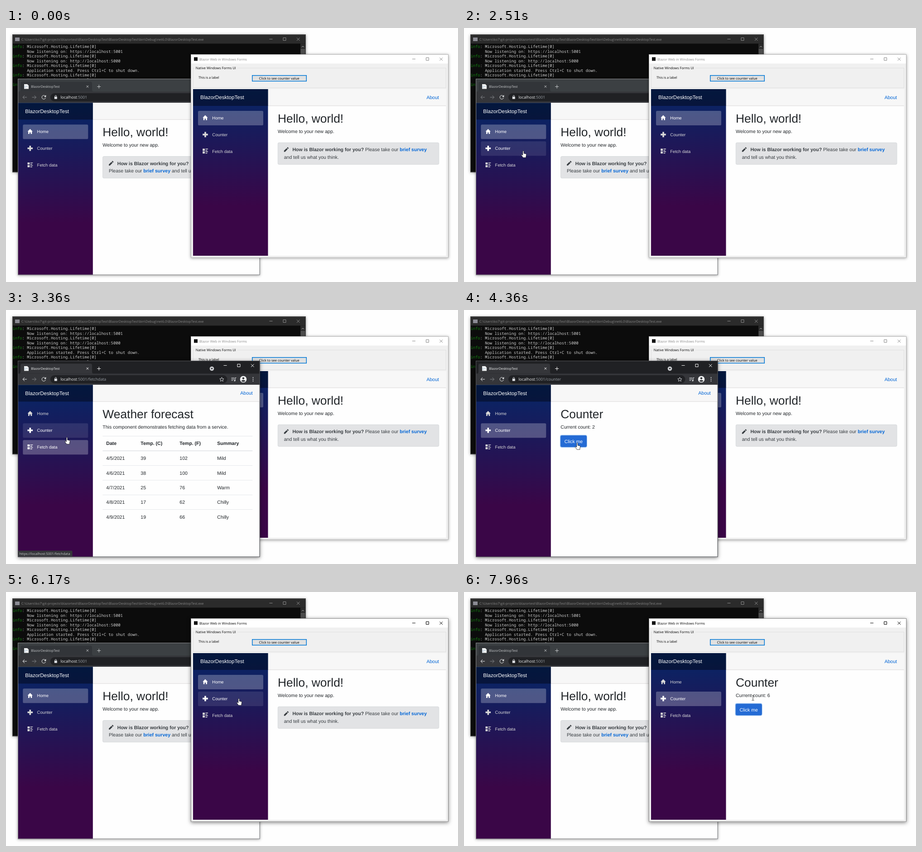
An HTML page for the animation above (8 s loop, 998 px wide and 561 px high).

```html
<!DOCTYPE html>
<html lang="en">
<head>
<meta charset="utf-8">
<title>Desktop and browser demo</title>
<style>
  html, body { margin: 0; width: 100%; height: 100%; overflow: hidden; background: #fefefe; }
  svg { display: block; width: 998px; height: 561px; }
  text { white-space: pre; text-rendering: geometricPrecision; font-family: "Liberation Sans", Arial, sans-serif; }
  .ui text { font-family: "Open Sans", "Noto Sans", sans-serif; }
  .mono text { font-family: "Noto Sans Mono", "DejaVu Sans Mono", monospace; }
  .line { fill: none; stroke-width: 1; }
  .shadow { filter: drop-shadow(0 1px 3px rgba(0,0,0,.4)); }
  .shadow.deep { filter: drop-shadow(0 2px 4.5px rgba(0,0,0,.5)); }
</style>
</head>
<body>
<svg viewBox="0 0 998 561">
  <defs>
    <linearGradient id="side" x1="0" y1="0" x2="0" y2="1">
      <stop offset="0" stop-color="#052767"/>
      <stop offset=".7" stop-color="#3a0647"/>
    </linearGradient>
  </defs>
  <g id="scene"></g>
  <g id="pointer"></g>
</svg>
<script>
const LOOP = 8000, TICK = 78;
const BODY = 10.56, UI = 7.45;
const INK = '#212529', LINK = '#0366d6';
const scene = document.getElementById('scene');
const pointer = document.getElementById('pointer');

const rect = (x, y, w, h, fill, more = '') =>
  `<rect x="${x}" y="${y}" width="${w}" height="${h}" fill="${fill}" ${more}/>`;
const text = (x, y, s, size, fill, more = '') =>
  `<text x="${x}" y="${y}" font-size="${size}" fill="${fill}" ${more}>${s}</text>`;
const shape = (d, fill, x = 0, y = 0) =>
  `<path d="${d}" fill="${fill}" transform="translate(${x} ${y})"/>`;
const line = (d, stroke, more = '') => `<path class="line" d="${d}" stroke="${stroke}" ${more}/>`;
const frame = (x, y, w, h, stroke) => rect(x + .5, y + .5, w - 1, h - 1, 'none', `stroke="${stroke}"`);

const windowButtons = (x, y, color) => line(
  `M${x - 3.5} ${y}h7M${x + 27} ${y - 3}h6v6h-6zM${x + 57} ${y - 3}l6.5 6.5m0-6.5l-6.5 6.5`,
  color, 'stroke-width=".9"');

/* ---------- web page shared by both windows ---------- */

const NAV = [
  ['home', 'Home', 'M5.7 0L0 5.6H1.6V11H4.4V7.5H7V11H9.8V5.6H11.4Z'],
  ['counter', 'Counter', 'M4 0h3.6v4h4v3.6h-4v4h-3.6v-4h-4v-3.6h4z'],
  ['fetchdata', 'Fetch data',
   'M0 0h4.8v4.6h-4.8zM0 6h4.8v4.6h-4.8zM6.2 0h5.6v1.4h-5.6zM6.2 3.2h4v1.4h-4zM6.2 6h5.6v1.4h-5.6zM6.2 9.2h4v1.4h-4z']
];
const PENCIL = 'M8.4 0l2.4 2.4-1.7 1.7-2.4-2.4zM6 2.4l2.4 2.4-5.7 5.6H.3V8z';
const FORECAST = [
  ['4/5/2021', 39, 102, 'Mild'], ['4/6/2021', 38, 100, 'Mild'], ['4/7/2021', 25, 76, 'Warm'],
  ['4/8/2021', 17, 62, 'Chilly'], ['4/9/2021', 19, 66, 'Chilly']
];

const heading = (title, lead) => text(187, 74, title, 26.4, INK) + text(187, 97, lead, BODY, INK);

function homePage(w, wide) {
  const ask = '<tspan font-weight="bold">How is Blazor working for you?</tspan>';
  const survey = `Please take our <tspan font-weight="bold" fill="${LINK}">brief survey</tspan>`;
  const rest = 'and tell us what you think.';
  const color = '#383d41';
  return heading('Hello, world!', 'Welcome to your new app.') +
    rect(187.3, 118.3, w - 203, 48, '#e2e3e5', 'rx="2.6" stroke="#d0d3d6" stroke-width=".8"') +
    shape(PENCIL, color, 200.5, 128) +
    text(219.5, 137.3, wide ? `${ask} ${survey}` : ask, BODY, color) +
    text(200.7, 153.5, wide ? rest : `${survey} ${rest}`, BODY, color);
}

function counterPage(count) {
  const ring = count ? rect(185.5, 110.5, 60, 28, '#9cc6f8', 'rx="4"') : '';
  return heading('Counter', `Current count: ${count}`) + ring +
    rect(187.3, 112.3, 57, 24.6, '#246bd5', 'rx="2.4" stroke="#1f61c2" stroke-width=".7"') +
    text(195.5, 128.6, 'Click me', BODY, '#fff');
}

function fetchPage() {
  const cols = [195, 271, 357, 440];
  const row = (cells, y, more) => cells.map((c, i) => text(cols[i], y, c, BODY, INK, more)).join('');
  const rule = (y, h) => rect(187, y, 331, h, '#dee2e6');
  return heading('Weather forecast', 'This component demonstrates fetching data from a service.') +
    rule(113, .8) + row(['Date', 'Temp. (C)', 'Temp. (F)', 'Summary'], 133, 'font-weight="bold"') + rule(145, 1.4) +
    FORECAST.map((r, i) => row(r, 166 + i * 32.35) + (i ? rule(145.6 + i * 32.35, .8) : '')).join('');
}

function webPage(x, y, w, h, page, count, hover, wide) {
  const nav = NAV.map(([id, label, icon], i) => {
    const top = 48 + i * 37, over = i === hover, on = id === page;
    const back = over || on ? rect(11, top, 144, 32, '#fff', `rx="2.6" fill-opacity="${over ? .1 : .25}"`) : '';
    const color = over || on ? '#fff' : '#d7d7d7';
    return back + shape(icon, color, 21.2, top + 9.6) + text(42.3, top + 19, label, 9.5, color);
  }).join('');
  const body = page === 'home' ? homePage(w, wide) : page === 'counter' ? counterPage(count) : fetchPage();
  return `<g transform="translate(${x} ${y})">` +
    rect(0, 0, w, h, '#fefefe') + rect(165, 0, w - 165, 37, '#f7f7f7') + rect(165, 36.4, w - 165, .9, '#d6d5d5') +
    rect(0, 0, 165.5, h, 'url(#side)') + rect(0, 0, 165.5, 37, '#000', 'fill-opacity=".4"') +
    text(16, 22.4, 'BlazorDesktopTest', 11.6, '#fff') +
    text(w - 15.5, 21.8, 'About', BODY, LINK, 'text-anchor="end"') + nav + body + '</g>';
}

/* ---------- windows ---------- */

function consoleWindow() {
  const path = String.raw`C:\Users\ko7\git-projects\blazortest\BlazorDesktopTest\BlazorDesktopTest\bin\Debug\net6.0\BlazorDesktopTest.exe`;
  const log = ['Now listening on: https://localhost:5001', 'Now listening on: http://localhost:5000',
    'Application started. Press Ctrl+C to shut down.', 'Hosting environment: Development', ''];
  const lines = log.map((s, i) => {
    const y = 44 + i * 21.1;
    return text(14.4, y, `info<tspan fill="#ccc">: Microsoft.Hosting.Lifetime[0]</tspan>`, 8.83, '#13810f') +
      text(46.2, y + 10.5, s, 8.83, '#ccc');
  }).join('');
  return rect(14, 14.5, 648, 304, '#0c0c0c', 'class="shadow"') + rect(14, 14.5, 648, 20, '#2b2b2b') +
    rect(20, 21, 10, 8, '#8b8b93') +
    `<g class="ui">${text(34, 27.8, path, UI, '#858585')}</g>` + windowButtons(585, 24.5, '#8c8c8c') +
    rect(650, 34.5, 11, 283, '#2a2a2a') + rect(650.5, 46, 10, 12, '#4d4d4d') +
    line('M653 42.5l2.5-2.5l2.5 2.5', '#ccc') +
    `<g class="mono">${lines}</g>` + frame(14, 14.5, 648, 304, '#4c4c4c');
}

function formsWindow(s, hover) {
  const active = s.active === 'forms';
  const color = active ? '#000' : '#8a8a8a';
  return rect(408, 58, 569, 449.5, '#f0f0f0', `class="shadow ${active ? 'deep' : ''}"`) +
    rect(408, 58, 569, 20.5, '#fff') + rect(415, 64.5, 8, 8, '#111') + windowButtons(900.5, 68.5, color) +
    rect(413.5, 88.5, 558, 43.5, 'none', 'stroke="#dcdcdc" stroke-width=".8"') + rect(417, 86, 94, 5, '#f0f0f0') +
    '<g class="ui">' + text(427, 71.5, 'Blazor Web in Windows Forms', UI, color) +
    text(418.8, 90.5, 'Native Windows Forms UI', UI, '#000') +
    text(425, 111.6, 'This is a label', 7.35, '#000') +
    rect(543.8, 104.8, 119.5, 12.6, '#e1e1e1', 'stroke="#0078d7" stroke-width="1.5"') +
    text(603.3, 113.8, 'Click to see counter value', 7.5, '#000', 'text-anchor="middle"') + '</g>' +
    webPage(413, 135, 558.5, 368, s.formsPage, s.formsCount, hover, true) +
    frame(408, 58, 569, 449.5, active ? '#8a8a8a' : '#b4b4b4');
}

function browserWindow(s, hover) {
  const active = s.active === 'browser';
  const tone = active ? '#fff' : '#c8cacc';
  const url = s.page === 'home' ? '' : '/' + s.page;
  const dot = y => `<circle cx="545.5" cy="${y}" r="1" fill="#e8eaed"/>`;
  const status = s.status === null ? '' : rect(26.5, 531.5, 120, 14, '#35363a', 'rx="1.5"') +
    text(29.5, 541, `https://localhost:5001${s.status}`, 7.5, '#c6c8ca');
  return rect(26, 112, 534.5, 433.5, '#35363a', `class="shadow ${active ? 'deep' : ''}"`) +
    rect(26, 112, 534.5, 28.5, active ? '#202124' : '#3c4043') +
    shape('M28 140.5q4 0 4-4v-14q0-4 4-4h150q4 0 4 4v14q0 4 4 4z', active ? '#35363a' : '#323539') +
    shape('M40 124h7l3 3v7.5h-10z', '#f1f3f4') + line('M42 127v6M44 129h4', '#9bb6cc', 'stroke-width=".8"') +
    line('M177.6 127l4.6 4.6m0-4.6l-4.6 4.6M201.2 129.5h8m-4-4v8', tone) +
    `<circle cx="454.5" cy="129.5" r="4.8" fill="#c9cbce"/>` + shape('M452 128.3h5l-2.5 3z', '#202124') +
    windowButtons(484, 122.5, tone) +
    line('M46 153h-9m4-4l-4 4l4 4', s.back ? '#f1f3f4' : '#84868a', 'stroke-width="1.2"') +
    line('M57.5 153h9m-4-4l4 4l-4 4', '#84868a', 'stroke-width="1.2"') +
    line('M86.8 150.5a4.2 4.2 0 1 0 .7 3.4', '#f1f3f4', 'stroke-width="1.4"') + shape('M88.3 148v4.3h-4.3z', '#f1f3f4') +
    rect(98, 144, 390.5, 18, '#202124', 'rx="9"') +
    rect(106.8, 151.8, 6, 5, '#dfe1e5', 'rx=".6"') + line('M108.1 152v-1.5q0-1.7 1.7-1.7t1.7 1.7v1.5', '#dfe1e5') +
    line('M476.4 148.6l1.3 3.1 3.3.3-2.5 2.2.8 3.3-2.9-1.8-2.9 1.8.8-3.3-2.5-2.2 3.3-.3z', '#d5d7da', 'stroke-width=".9"') +
    line('M497.5 150h7m-7 2.8h7m-7 2.8h4M506 156v-6.4h2.4', '#e8eaed', 'stroke-width="1.2"') +
    `<circle cx="505" cy="156" r="1.5" fill="#e8eaed"/><circle cx="524" cy="153" r="7.3" fill="#f1f3f4"/>` +
    `<circle cx="524" cy="150.8" r="2.3" fill="#35363a"/>` + shape('M519.3 156.8q4.7-4.6 9.4 0q-4.7 4-9.4 0z', '#35363a') +
    dot(149.2) + dot(153) + dot(156.8) +
    '<g class="ui">' + text(55.3, 132, 'BlazorDesktopTest', 7.3, active ? '#f1f3f4' : '#c8cacc') +
    text(120.3, 156.2, `localhost<tspan fill="#9aa0a6">:5001${url}</tspan>`, 8.75, '#f1f3f4') + '</g>' +
    webPage(26.3, 165.3, 534, 380, s.page, s.count, hover, false) +
    `<g class="ui">${status}</g>` + frame(26, 112, 534.5, 433.5, active ? '#55565a' : '#8a8b8e');
}

/* ---------- timeline ---------- */

const EVENTS = [
  [0, { front: 'forms', active: '', page: 'home', count: 0, formsPage: 'home', formsCount: 0, status: null, back: false }],
  [2590, { front: 'browser', active: 'browser', status: '/counter' }],
  [2750, { page: 'counter', back: true }],
  [3210, { page: 'fetchdata', status: '/fetchdata' }],
  [3600, { page: 'counter', status: '/counter' }],
  [3980, { status: null }],
  [4210, { count: 1 }], [4360, { count: 2 }], [4450, { count: 3 }],
  [4690, { status: '' }],
  [4760, { page: 'home' }],
  [4920, { status: null }],
  [5710, { front: 'forms', active: 'forms' }],
  [6490, { formsPage: 'counter' }],
  [6960, { formsCount: 1 }], [7110, { formsCount: 2 }], [7330, { formsCount: 3 }],
  [7480, { formsCount: 4 }], [7630, { formsCount: 5 }], [7720, { formsCount: 6 }]
];

// time, hot spot x and y, pointer kind
const MOVES = [
  [200, 792, 437, 'arrow'], [360, 671, 358, 'arrow'], [660, 671, 358, 'arrow'], [890, 667, 354, 'arrow'],
  [1060, 667, 354, 'arrow'], [1520, 517, 241, 'hand'], [1830, 517, 241, 'arrow'], [1990, 267, 272, 'arrow'],
  [2200, 267, 272, 'arrow'], [2510, 131, 271, 'hand'], [3060, 131, 271, 'hand'], [3210, 130, 300, 'hand'],
  [3360, 134.5, 281, 'hand'], [3520, 131, 268, 'hand'], [3900, 131, 268, 'arrow'], [4130, 250, 293, 'hand'],
  [4450, 250, 293, 'arrow'], [4690, 125, 232, 'hand'], [4840, 125, 232, 'arrow'], [5170, 608.5, 214, 'beam'],
  [5330, 608.5, 214, 'arrow'], [5480, 662, 141, 'arrow'], [5710, 662, 141, 'arrow'], [6090, 514, 235, 'hand'],
  [6490, 514, 235, 'arrow'], [6880, 628, 259, 'hand'], [7800, 628, 259, 'hand'], [7960, 638, 234, 'beam']
];

const POINTERS = {
  arrow: '<path d="M0 0V11.5L2.7 9L4.5 13L6.2 12.3L4.5 8.4H8.2Z" fill="#fff" stroke="#000" stroke-width=".7"/>',
  hand: '<path d="M-1.2 1.2Q0-.5 1.2 1.2V6L5.6 7Q6.9 7.4 6.7 9L5.9 13V15.2H-.6L-4.3 10Q-4.7 8.4-3.4 8.4L-1.2 10Z" fill="#fff" stroke="#000" stroke-width=".7"/>',
  beam: '<path d="M-2.5-5.3H-.7L0-4.6L.7-5.3H2.5M0-4.6V4.6M-2.5 5.3H-.7L0 4.6L.7 5.3H2.5" fill="none" stroke="#222" stroke-width=".9"/>'
};

const stateAt = t => Object.assign({}, ...EVENTS.filter(e => e[0] <= t).map(e => e[1]));

function pointerAt(t) {
  const i = MOVES.findLastIndex(m => m[0] <= t);
  if (i < 0) return null;
  const a = MOVES[i], b = MOVES[i + 1] || a;
  const held = Math.floor((t - a[0]) / TICK) * TICK;
  const f = b === a ? 0 : Math.min(1, held / (b[0] - a[0]));
  return { x: a[1] + (b[1] - a[1]) * f, y: a[2] + (b[2] - a[2]) * f, kind: a[3] };
}

function navUnder(p, left, top) {
  if (!p || p.x < left + 11 || p.x > left + 155) return -1;
  const y = p.y - top - 48, i = Math.floor(y / 37);
  return i >= 0 && i < NAV.length && y - i * 37 <= 32 ? i : -1;
}

let shown = '';
function draw(t) {
  const s = stateAt(t), p = pointerAt(t);
  const overForms = s.front === 'forms' ? navUnder(p, 413, 135) : -1;
  const overBrowser = navUnder(p, 26.3, 165.3);
  const key = JSON.stringify([s, overForms, overBrowser]);
  if (key !== shown) {
    const forms = formsWindow(s, overForms), browser = browserWindow(s, overBrowser);
    scene.innerHTML = consoleWindow() + (s.front === 'forms' ? browser + forms : forms + browser);
    shown = key;
  }
  const kind = p && (overForms >= 0 || overBrowser >= 0 ? 'hand' : p.kind);
  pointer.innerHTML = p ? `<g transform="translate(${p.x} ${p.y})">${POINTERS[kind]}</g>` : '';
}

const start = performance.now();
function tick() {
  draw((performance.now() - start) % LOOP);
  requestAnimationFrame(tick);
}
tick();
</script>
</body>
</html>
```
